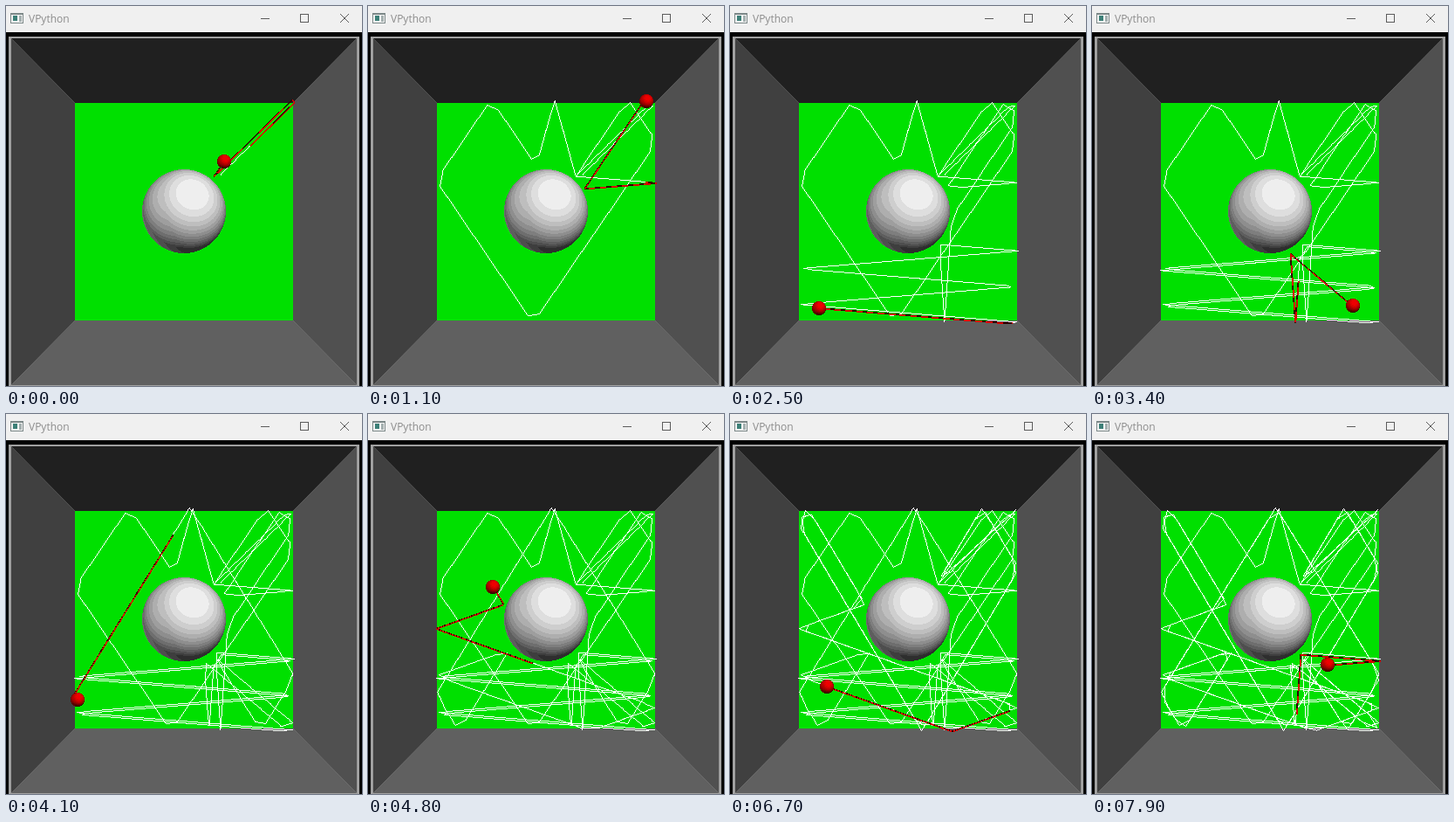
Write an HTML page with a canvas that moves like this. It is 408 by 435 pixels and loops after 8000 ms.

```html
<!DOCTYPE html>
<html>
<head>
<meta charset="utf-8">
<title>VPython</title>
<style>
html, body { margin: 0; width: 100%; height: 100%; overflow: hidden; background: #000; }
canvas { display: block; }
</style>
</head>
<body>
<canvas id="stage" width="408" height="435"></canvas>
<script>
const ctx = document.getElementById('stage').getContext('2d');
const LOOP = 8000, TICK = 100;
const STEP = 22.5;    // spacing of the white trace points
const TAIL = 222;     // length of the red trail
const SPEED = 126;    // px per tick on the way back
const LEFT = 78, RIGHT = 331, TOP = 107, BOTTOM = 363;

// Hits on the sphere: tick, x, y and the mirrored room (column, row) in which
// the hit lies when the walls bounced off before it are unfolded.
const hits = [
  [-2.3, 246, 193, 0, 0],
  [-0.18, 238, 195, 1, -1],
  [6.85, 193, 183, 2, -3],
  [8.3, 238, 195, 0, -1],
  [9.92, 248, 209, 1, 0],
  [12.37, 254, 242, 1, -1],
  [14.2, 240, 273, 0, 1],
  [32.1, 239, 275, 9, 1],
  [33.3, 227, 283, 0, 1],
  [35.2, 240, 279, 1, 1],
  [42.33, 162, 270, 2, 3],
  [47.83, 155, 218, -3, 1],
  [53.85, 239, 191, -2, -3],
  [55.83, 239, 191, 1, -1]
].map(([tick, x, y, col, row]) => ({ tick, x, y, col, row }));

function unfold(v, lo, hi, room) {
  return room % 2 ? lo + hi - v + room * (hi - lo) : v + room * (hi - lo);
}

function fold(u, lo, hi) {
  const span = hi - lo, room = Math.floor((u - lo) / span);
  const rest = u - lo - room * span;
  return room % 2 ? hi - rest : lo + rest;
}

const legs = [];
let total = 0;

function addLeg(a, b, col, row, t0, t1) {
  const dx = unfold(b.x, LEFT, RIGHT, col) - a.x;
  const dy = unfold(b.y, TOP, BOTTOM, row) - a.y;
  const len = Math.hypot(dx, dy);
  legs.push({ x: a.x, y: a.y, dx, dy, len, start: total, t0, t1: t1 ?? t0 + len / SPEED });
  total += len;
}

for (let n = 1; n < hits.length; n++) {
  const a = hits[n - 1], b = hits[n];
  addLeg(a, b, b.col, b.row, a.tick, b.tick);
}

// the hit in the corner sends the ball back along its own path
const reverse = room => room % 2 ? room : -room;
for (let n = hits.length - 2; n > 6; n--) {
  const a = hits[n], b = hits[n - 1];
  addLeg(a, b, reverse(a.col), reverse(a.row), legs.at(-1).t1);
}

function travelled(tick) {
  const leg = legs.find(l => tick < l.t1);
  return leg.start + leg.len * (tick - leg.t0) / (leg.t1 - leg.t0);
}

function pointAt(d) {
  const leg = legs.find(l => d < l.start + l.len);
  const f = (d - leg.start) / leg.len;
  return {
    x: fold(leg.x + leg.dx * f, LEFT, RIGHT),
    y: fold(leg.y + leg.dy * f, TOP, BOTTOM),
    flat: Math.abs(leg.dx) > Math.abs(leg.dy)
  };
}

// hard-edged line, one pixel wide
function pixelLine(a, b) {
  const dx = b.x - a.x, dy = b.y - a.y;
  const n = Math.ceil(Math.max(Math.abs(dx), Math.abs(dy), 1));
  for (let i = 0; i <= n; i++) {
    ctx.fillRect(Math.floor(a.x + dx * i / n), Math.floor(a.y + dy * i / n), 1, 1);
  }
}

function drawTrails(d) {
  const tail = d - TAIL;
  ctx.fillStyle = '#fff';
  let last = pointAt(0);
  for (let s = STEP; s < tail + STEP; s += STEP) {
    const next = pointAt(Math.min(s, tail));
    pixelLine(last, next);
    last = next;
  }
  // thin lit tube: red and dark alternate as the line crosses pixel rows
  for (let s = tail; s < d; s += 0.7) {
    const p = pointAt(s), across = p.flat ? p.y : p.x;
    ctx.fillStyle = across % 1 < 0.6 ? '#d80000' : '#300000';
    ctx.fillRect(Math.floor(p.x), Math.floor(p.y), p.flat ? 1 : 2, p.flat ? 2 : 1);
  }
}

// sphere lit by a key light, a weak back light and ambient light, in flat bands
function makeSphere(r, red, green, blue) {
  const size = r * 2 + 2, c = size / 2;
  const cv = document.createElement('canvas');
  cv.width = cv.height = size;
  const g = cv.getContext('2d'), img = g.createImageData(size, size);
  for (let py = 0; py < size; py++) {
    for (let px = 0; px < size; px++) {
      const x = (px + 0.5 - c) / r, y = (c - py - 0.5) / r, q = x * x + y * y;
      if (q > 1) continue;
      const z = Math.sqrt(1 - q);
      const main = Math.max(0, 0.22 * x + 0.44 * y + 0.88 * z);
      const rear = Math.max(0, -0.88 * x - 0.22 * y - 0.44 * z);
      const v = 255 * (0.2 + 0.8 * main + 0.3 * rear);
      const band = Math.min(238, Math.floor((v + 1) / 16) * 16 - 2);
      img.data.set([band * red, band * green, band * blue, 255], (py * size + px) * 4);
    }
  }
  g.putImageData(img, 0, 0);
  return cv;
}

const globe = makeSphere(48, 1, 1, 1);
const ball = makeSphere(8, 1, 0, 0);

function putSphere(img, x, y) {
  ctx.drawImage(img, Math.round(x - img.width / 2), Math.round(y - img.height / 2));
}

function box(color, x, y, w, h) {
  ctx.fillStyle = color;
  ctx.fillRect(x, y, w, h);
}

function stroke(x0, y0, x1, y1) {
  ctx.beginPath();
  ctx.moveTo(x0, y0);
  ctx.lineTo(x1, y1);
  ctx.stroke();
}

function drawTitleBar() {
  box('#f0f0f0', 0, 0, 408, 30);
  box('#7c8888', 5, 8, 15, 12);
  box('#f4f4f4', 6, 10, 13, 9);
  box('#3d8078', 8, 11, 5, 6);
  box('#a5b0b0', 15, 11, 3, 7);

  ctx.fillStyle = '#8c8c8c';
  ctx.font = '12px "Open Sans", "Noto Sans", sans-serif';
  ctx.fillText('VPython', 26, 19);

  ctx.strokeStyle = '#5c5c5c';
  ctx.lineWidth = 1;
  stroke(292, 14.5, 302, 14.5);
  ctx.strokeRect(337.5, 9.5, 9, 9);
  stroke(383, 9, 393, 19);
  stroke(393, 9, 383, 19);
}

function wall(color, x0, y0, x1, y1, x2, y2, x3, y3) {
  ctx.fillStyle = color;
  ctx.beginPath();
  ctx.moveTo(x0, y0);
  ctx.lineTo(x1, y1);
  ctx.lineTo(x2, y2);
  ctx.lineTo(x3, y3);
  ctx.fill();
}

function drawRoom() {
  box('#000', 0, 30, 408, 405);
  box('#a0a0a0', 3, 35, 402, 400);
  wall('#202020', 6, 37, 402, 37, 329, 111, 79, 111);
  wall('#404040', 6, 37, 79, 111, 79, 360, 6, 434);
  wall('#505050', 402, 37, 402, 434, 329, 360, 329, 111);
  wall('#606060', 6, 434, 79, 360, 329, 360, 402, 434);
  box('#00e000', 79, 111, 250, 249);
}

function frame() {
  const d = travelled(Math.floor(performance.now() % LOOP / TICK));
  const p = pointAt(d);
  drawRoom();
  drawTitleBar();
  drawTrails(d);
  putSphere(globe, 204, 235);
  putSphere(ball, p.x, p.y);
  requestAnimationFrame(frame);
}
frame();
</script>
</body>
</html>
```
